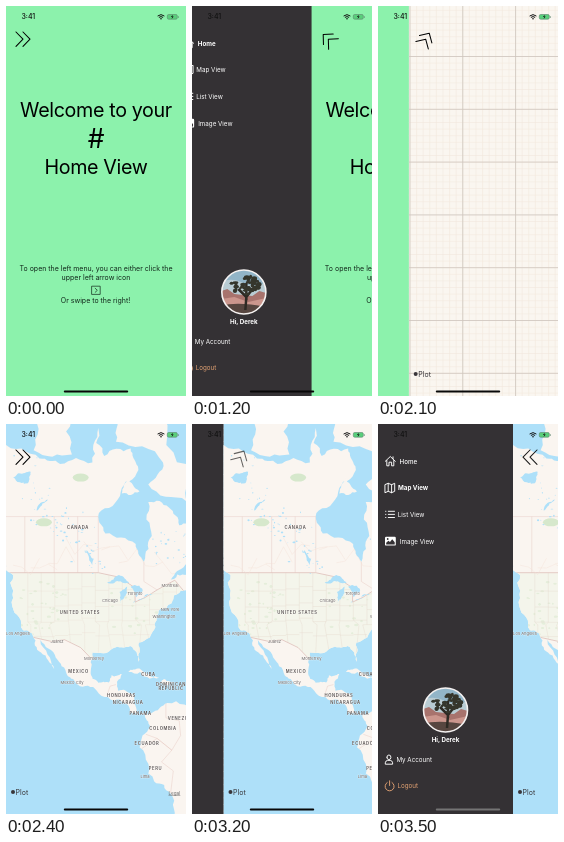
Recreate the animation shown at these times as an HTML page. Size 180x390 px, loop 3.6 s.

```html
<!DOCTYPE html>
<html lang="en">
<head>
<meta charset="utf-8">
<title>Side menu</title>
<style>
html, body { margin: 0; width: 100%; height: 100%; overflow: hidden; background: #343134; }
svg { display: block; width: 100vw; height: 100vh; font-family: Inter, Roboto, sans-serif; }
.mid { text-anchor: middle; }
.line { fill: none; stroke: currentColor; stroke-linecap: round; stroke-linejoin: round; }
#menu { color: #fff; fill: #fff; font-size: 6.25px; }
#menu .line { fill: none; stroke-width: .95; }
.place { font-size: 4.1px; fill: #68615f; stroke: #fff; stroke-opacity: .7; stroke-width: .6; paint-order: stroke; }
.country { font-size: 4.2px; font-weight: 600; letter-spacing: .6px; fill: #57504f; }
</style>
</head>
<body>
<svg viewBox="0 0 180 390" preserveAspectRatio="none">
  <defs>
    <clipPath id="stage"><rect width="180" height="390"/></clipPath>
    <clipPath id="round"><circle cx="67.5" cy="286" r="22"/></clipPath>
    <clipPath id="onLand"></clipPath>
    <clipPath id="inStates"></clipPath>
  </defs>
  <rect id="back" width="180" height="390"/>

  <g id="menu">
    <g id="rowHome">
      <path class="line" d="M7.3 37.3 12.3 32.5 17.3 37.3M8.8 36.5V41.8H11V38.2H13.6V41.8H15.8V36.5M15 34.8V32.8"/>
      <text x="21.5" y="39.5">Home</text>
    </g>
    <g id="rowMap">
      <path class="line" d="M7.3 60.5 10.2 59.3 13.6 60.7 16.7 59.3V67.3L13.6 68.7 10.2 67.3 7.3 68.6ZM10.2 59.3V67.3M13.6 60.7V68.7"/>
      <text x="20" y="66.1">Map View</text>
    </g>
    <path class="line" d="M10.3 87.3H16.5M10.3 90.4H16.5M10.3 93.5H16.5M7.6 87.3h.3M7.6 90.4h.3M7.6 93.5h.3"/>
    <text x="19.8" y="92.6">List View</text>
    <rect x="7" y="112.8" width="10.8" height="8.8" rx="1.2"/>
    <path d="M8.2 120.4V118.8L10.4 116.7 12 118 14.2 115.3 16.7 118.2V120.4Z" fill="#343134"/>
    <circle cx="9.7" cy="115" r=".9" fill="#343134"/>
    <text x="21.8" y="119.6">Image View</text>

    <g clip-path="url(#round)">
      <rect x="45" y="263" width="45" height="46" fill="#92b5c8"/>
      <path d="M45 276Q55 271 67 277T90 276V290H45Z" fill="#b9ccd3"/>
      <path d="M45 285 51 283 58 288 76 290 83 285 90 287V309H45Z" fill="#a8736d"/>
      <path d="M45 293 58 291 72 296 90 292V309H45Z" fill="#cb968d"/>
      <path d="M45 300Q60 295 90 301V309H45Z" fill="#574640"/>
      <path d="M69 304 70 291 62 283M70 291 77 282M70 294V277" fill="none" stroke="#2d2a24" stroke-width="2.5"/>
      <g id="leaves" fill="#35362c"></g>
    </g>
    <circle cx="67.5" cy="286" r="22" fill="none" stroke="#f5f2f1" stroke-width="1.6"/>
    <text class="mid" x="67.5" y="317.7" font-weight="700">Hi, Derek</text>

    <path class="line" d="M8.9 333.3a2 2.3 0 1 1 4 0a2 2.3 0 1 1-4 0M7.3 339.8V338.8Q7.5 336.6 9.6 336.4H12.2Q14.4 336.6 14.6 338.8V339.8Z"/>
    <text x="18.4" y="337.6">My Account</text>
    <g style="color:#e2a273" fill="#e2a273">
      <path class="line" d="M9.2 358.5A4.5 4.5 0 1 0 14 358.5M11.6 356.8V361.5"/>
      <text x="19.4" y="364.2">Logout</text>
    </g>
  </g>

  <g id="page" clip-path="url(#stage)">
    <g id="home">
      <rect width="180" height="390" fill="#8cf2ac"/>
      <g class="mid" font-size="19.7" letter-spacing="-.35">
        <text x="90" y="111.3">Welcome to your</text>
        <text x="90" y="141.6" font-size="26.5">#</text>
        <text x="90" y="168.3">Home View</text>
      </g>
      <g class="mid" font-size="7" fill="#12281b">
        <text x="90" y="264.8">To open the left menu, you can either click the</text>
        <text x="90" y="274.3">upper left arrow icon</text>
        <text x="89.5" y="297.4">Or swipe to the right!</text>
      </g>
      <path class="line" d="M86 280.2H94.2V288.4H86ZM89.2 282.3 91.3 284.3 89.2 286.3" stroke-width=".7" color="#12281b"/>
    </g>

    <g id="atlas">
      <g id="grid"></g>
      <g id="world">
        <rect width="180" height="390" fill="#aee0f9"/>
        <g id="land" fill="#faf5f0"></g>
        <g clip-path="url(#onLand)">
          <g id="states"></g>
          <g id="borders" fill="none" stroke="#e2c3bc" stroke-width=".4"></g>
        </g>
        <g id="lakes" fill="#aee0f9"></g>
        <g id="labels" class="mid"></g>
        <text x="162.5" y="370.5" font-size="4.6" fill="#666" text-decoration="underline">Legal</text>
      </g>
      <circle cx="7" cy="368" r="2" fill="#39363a"/>
      <text x="9.6" y="370.5" font-size="7" fill="#39363a">Plot</text>
    </g>

    <path id="arrow" class="line" stroke-width="1.05" d="M10 26 17 33.2 10 40.4M17 26 24 33.2 17 40.4"/>
  </g>

  <g id="status" fill="#111">
    <text x="15.4" y="13.4" font-size="7" font-weight="500">3:41</text>
    <path class="line" d="M151.9 9.8Q155 7.2 158.1 9.8M153.2 11.2Q155 9.7 156.8 11.2" stroke-width="1" color="#111"/>
    <circle cx="155" cy="12.7" r=".8"/>
    <rect x="161.3" y="8.5" width="10" height="4.7" rx="1.4" fill="#59cf7b" stroke="#5f8570" stroke-width=".6"/>
    <path d="M166.8 8.8 164.9 11.1H166.2L165.6 13 167.7 10.5H166.3Z"/>
    <rect x="172" y="10" width=".8" height="1.8" rx=".4" fill="#5f8570"/>
  </g>
  <rect id="bar" x="57.8" y="384.4" width="64.4" height="2.1" rx="1"/>
</svg>

<script>
const $ = id => document.getElementById(id);
const LOOP = 3600, STEP = 100, OPEN = 135;
const clamp = v => Math.max(0, Math.min(1, v));
const phase = (t, start, length) => clamp((t - start) / length);
const show = (id, on) => $(id).setAttribute('display', on ? 'inline' : 'none');

let seed = 11;
const rnd = () => (seed = seed * 16807 % 2147483647) / 2147483647;
const spread = size => (rnd() - .5) * size;
const times = (n, f) => Array.from({ length: n }, (_, i) => f(i)).join('');
const blob = (x, y, rx, ry) => `<ellipse cx="${x}" cy="${y}" rx="${rx}" ry="${ry}"/>`;

// cubic-bezier(.42, 0, .58, 1)
function ease(x) {
  let lo = 0, hi = 1;
  for (let i = 0; i < 24; i++) {
    const u = (lo + hi) / 2;
    const bx = 1.26 * u * (1 - u) ** 2 + 1.74 * u * u * (1 - u) + u ** 3;
    if (bx < x) lo = u; else hi = u;
  }
  return lo * lo * (3 - 2 * lo);
}

// Mercator projection of degrees to stage pixels
const SCALE = 2.94;
function project([lon, lat]) {
  const north = Math.log(Math.tan(Math.PI * (.25 + lat / 360))) * 180 / Math.PI;
  return [(lon + 126.4) * SCALE, 314.4 - north * SCALE];
}
const places = text => text.split(' ').map(p => project(p.split(',').map(Number)));
const trace = points => 'M' + points.map(p => p.map(v => v.toFixed(1)).join(' ')).join('L');

// Midpoint displacement gives key points a natural coastline.
function rough(points, depth = 3) {
  if (!depth) return points;
  const finer = points.flatMap((a, i) => {
    const b = points[(i + 1) % points.length];
    const k = spread(.36);
    return [a, [(a[0] + b[0]) / 2 - (b[1] - a[1]) * k, (a[1] + b[1]) / 2 + (b[0] - a[0]) * k]];
  });
  return rough(finer, depth - 1);
}
const shore = text => `<path d="${trace(rough(places(text)))}Z"/>`;

function buildGrid() {
  const cell = 52.8;
  const rule = (gap, color, width) => {
    let d = '';
    for (let x = 1.3 - cell; x < 180; x += gap) d += `M${x.toFixed(1)} 0V390`;
    for (let y = 50.5 - cell; y < 390; y += gap) d += `M0 ${y.toFixed(1)}H180`;
    return `<path d="${d}" stroke="${color}" stroke-width="${width}"/>`;
  };
  $('grid').innerHTML = '<rect width="180" height="390" fill="#faf6f0"/>' +
    rule(cell / 8, '#f1e7dd', .6) + rule(cell, '#cfc6be', .8);
}

function buildLand() {
  const pacific = '-132,54 -124,48.5 -124.3,41 -120.6,34.5 -117.2,32.8 -114.5,28 -110,23 -114.7,31.7 -109.5,26.5 -105.6,21 -102,18 -95.5,16 -87.5,13 -83.5,8.5 -79.5,8.5 -77.3,4 -81,-3 -76,-14.5 -70.4,-18.4 -70.3,-28';
  const atlantic = '-60,-28 -60,10.5 -71.5,12 -77,8.5 -82,9 -83.3,15 -88.3,16 -87,21.4 -90.5,21 -91.5,18.7 -95,18.6 -97.6,22 -97,28 -90,29.3 -84.2,30 -81.2,25.2 -81.2,31 -75.6,35.4 -74,40.2 -70,41.8 -67,44.8 -60,46';
  const arctic = '-64.5,48.8 -71,47 -66,50.2 -58,51 -62,58 -67.5,58.5 -71,61.5 -78,62.4 -76.8,56.5 -79.5,51.4 -82.3,55 -92.6,57 -94,61 -87,64.5 -81.5,67.5 -84,69.7 -93,68.8 -95,72 -97,68 -108,67.8 -115,68.5 -128,70.3 -140,69';
  const baffin = '-65,62.5 -78,65 -73,68 -89,70.5 -90,74 -75,74 -62,67';
  const victoria = '-104,69 -117,69.5 -117,74 -105,74';
  const southampton = '-81,64 -87,63.7 -85,66';
  const cuba = '-84.8,22 -81,23.1 -74.3,20.2 -77.5,19.9';
  const hispaniola = '-74,18.5 -72.7,19.8 -68.5,18.6';
  const vancouver = '-128,50.6 -123.5,48.4 -125,50';
  const coasts = [`${pacific} ${atlantic} ${arctic}`, baffin, victoria, southampton, cuba, hispaniola, vancouver];
  $('land').innerHTML = $('onLand').innerHTML = coasts.map(shore).join('');
}

function buildStates() {
  const edge = trace(places('-130,49 -95,49 -88,48 -82.5,45.5 -82.5,42 -79,43.2 -75,45 -69,47.3 -66,44.8 -66,24 -97,24 -97.2,26 -101,29.5 -106.5,31.8 -111,31.3 -117.2,32.5 -130,32.5')) + 'Z';
  $('inStates').innerHTML = `<path d="${edge}"/>`;
  let lines = '';
  for (let lon = -119; lon < -68; lon += 4.6) {
    const shift = spread(2);
    lines += trace([[lon, 49], [lon, 37 + shift], [lon + spread(4), 36], [lon + 1, 28]].map(project));
    for (let lat = 33 + shift; lat < 48; lat += 4) lines += trace([[lon, lat], [lon + 4.6, lat]].map(project));
  }
  const woods = times(60, i => {
    const [x, y] = project([(i % 3 ? -114 : -83) + spread(16), 40 + spread(14)]);
    return blob(x, y, .7 + rnd() * 1.5, .5 + rnd());
  });
  $('states').innerHTML = `<path d="${edge}" fill="#f4f5eb" stroke="#dcb8b3" stroke-width=".7"/>
    <g clip-path="url(#inStates)"><g fill="#e5eedb">${woods}</g>
    <path id="stateLines" d="${lines}" fill="none" stroke="#e3d3c9" stroke-width=".35"/></g>`;
}

function buildBorders() {
  const provinces = [-120, -110, -102, -95].map(lon => trace([[lon, 49], [lon, 60]].map(project))).join('');
  const others = ['-139,60 -95,60 -89,56.5', '-79.5,51.4 -79.5,47 -75,45', '-92,14.5 -91,17.5 -89,18', '-89,14 -83.5,15',
    '-72,12 -72,7 -67.5,6 -67,1 -70,-4 -75,0 -78.8,1.4', '-80.3,-3.5 -75,0 -70,-4 -73.5,-8 -69.5,-11 -70.4,-18.4']
    .map(text => trace(places(text))).join('');
  const roads = times(9, i => {
    const lon = -124 + i * 6;
    return trace([0, 1, 2, 3].map(k => project([lon + k * 3, 55 - Math.abs(i - 4) + spread(5)])));
  });
  const parks = [[-101, 66], [-113.5, 59]].map(([lon, lat]) => blob(...project([lon, lat]), 8, 4)).join('');
  $('borders').innerHTML = `<g fill="#d6e8cc" stroke="none">${parks}</g>
    <path d="${provinces}${others}"/><path d="${roads}" stroke="#f1dfd4"/>`;
}

function buildLakes() {
  const large = ['-92,46.8 -88,48.5 -84.5,46.6 -88,47', '-87.6,41.8 -86.3,43 -85.2,45.8 -87.8,44.5',
    '-82,43.2 -80,44.6 -81,46 -84,45.8', '-83.2,41.7 -79,42.8 -81,42.7', '-79.6,43.4 -76.4,43.8 -78,44',
    '-97,50.5 -96.5,52 -99,53.8', '-116,61 -112,62.8 -114,62.2', '-124,66 -119,65.2 -118,66.8 -122,66.6'].map(shore).join('');
  // Small lakes follow the edge of the Canadian shield.
  const small = times(70, () => {
    const a = rnd();
    const [x, y] = project([-121 + a * 28 + spread(9), 66 - a * 15 + spread(7)]);
    return blob(x, y, .3 + rnd() * 1.2, .3 + rnd() * .7);
  });
  const quebec = times(24, () => blob(...project([-70 + spread(14), 54.5 + spread(7)]), .3 + rnd(), .3 + rnd() * .6));
  $('lakes').innerHTML = large + small + quebec;
}

function buildLabels() {
  const countries = [
    ['CANADA', 72, 105.2], ['UNITED STATES', 74, 190], ['MEXICO', 72.5, 249.2], ['CUBA', 142.5, 252],
    ['HONDURAS', 115.5, 273], ['NICARAGUA', 122, 280.4], ['PANAMA', 134.5, 291], ['DOMINICAN', 165, 262],
    ['REPUBLIC', 165, 266.4], ['COLOMBIA', 157, 306], ['VENEZUELA', 177, 295.5],
    ['ECUADOR', 141, 321], ['PERU', 149.5, 345.6]
  ];
  const cities = [
    ['Chicago', 104, 178.4], ['Toronto', 129, 171.4], ['Montreal', 164, 163], ['New York', 164, 187],
    ['Washington', 158, 194.4], ['Monterrey', 88, 236], ['Juárez', 51, 219.3],
    ['Mexico City', 66, 259.6], ['Los Angeles', 12, 211], ['Lima', 139, 353.5]
  ];
  const write = (list, kind) => list.map(([s, x, y]) => `<text class="place ${kind}" x="${x}" y="${y}">${s}</text>`).join('');
  $('labels').innerHTML = write(countries, 'country') + write(cities, '');
}

function buildTree() {
  $('leaves').innerHTML = times(46, () => {
    const a = rnd() * 7, r = Math.sqrt(rnd());
    return blob(69 + 14 * r * Math.cos(a), 279 + 9 * r * Math.sin(a), 1.2 + rnd() * 1.9, 1.1 + rnd() * 1.4);
  });
}

function draw(now) {
  const t = Math.floor(now % LOOP / STEP) * STEP;
  const onMap = t >= 2000;
  const closing = t >= 2000 && t < 3000;

  // The arrow turns linearly while the page slides with easing.
  const p = t < 1900 ? phase(t, 933, 350) : t < 3000 ? 1 - phase(t, 1899, 300) : phase(t, 3083, 350);
  const x = OPEN * ease(p);

  $('page').setAttribute('transform', `translate(${x.toFixed(2)} 0)`);
  $('menu').setAttribute('transform', `translate(${(x - OPEN).toFixed(2)} 0)`);
  $('arrow').setAttribute('transform', `rotate(${-180 * p} 17 33.2)`);
  // A tap on the map's arrow fades it, then it recovers.
  $('arrow').setAttribute('opacity', t < 3100 ? 1 : .5 + .4 * phase(t, 3100, 400));
  $('back').setAttribute('fill', closing ? '#8cf2ac' : '#343134');

  show('menu', !closing);
  show('home', !onMap);
  show('atlas', onMap);
  show('world', t >= 2300);
  show('labels', t >= 2400);
  $('stateLines').setAttribute('opacity', .6 + .4 * phase(t, 2300, 300));

  $('rowHome').setAttribute('font-weight', onMap ? 500 : 700);
  $('rowMap').setAttribute('font-weight', onMap ? 700 : 400);
  $('rowMap').setAttribute('opacity', t === 1800 ? .4 : 1);

  const dim = t < 1900 ? phase(t, 1200, 300) : t < 3000 ? 1 - phase(t, 1900, 200) : phase(t, 3300, 200);
  const grey = Math.round(8 + 108 * dim);
  $('bar').setAttribute('fill', `rgb(${grey},${grey},${grey})`);
}

[buildGrid, buildLand, buildStates, buildBorders, buildLakes, buildLabels, buildTree].forEach(build => build());
const start = performance.now();
function tick() {
  draw(performance.now() - start);
  requestAnimationFrame(tick);
}
tick();
</script>
</body>
</html>
```
